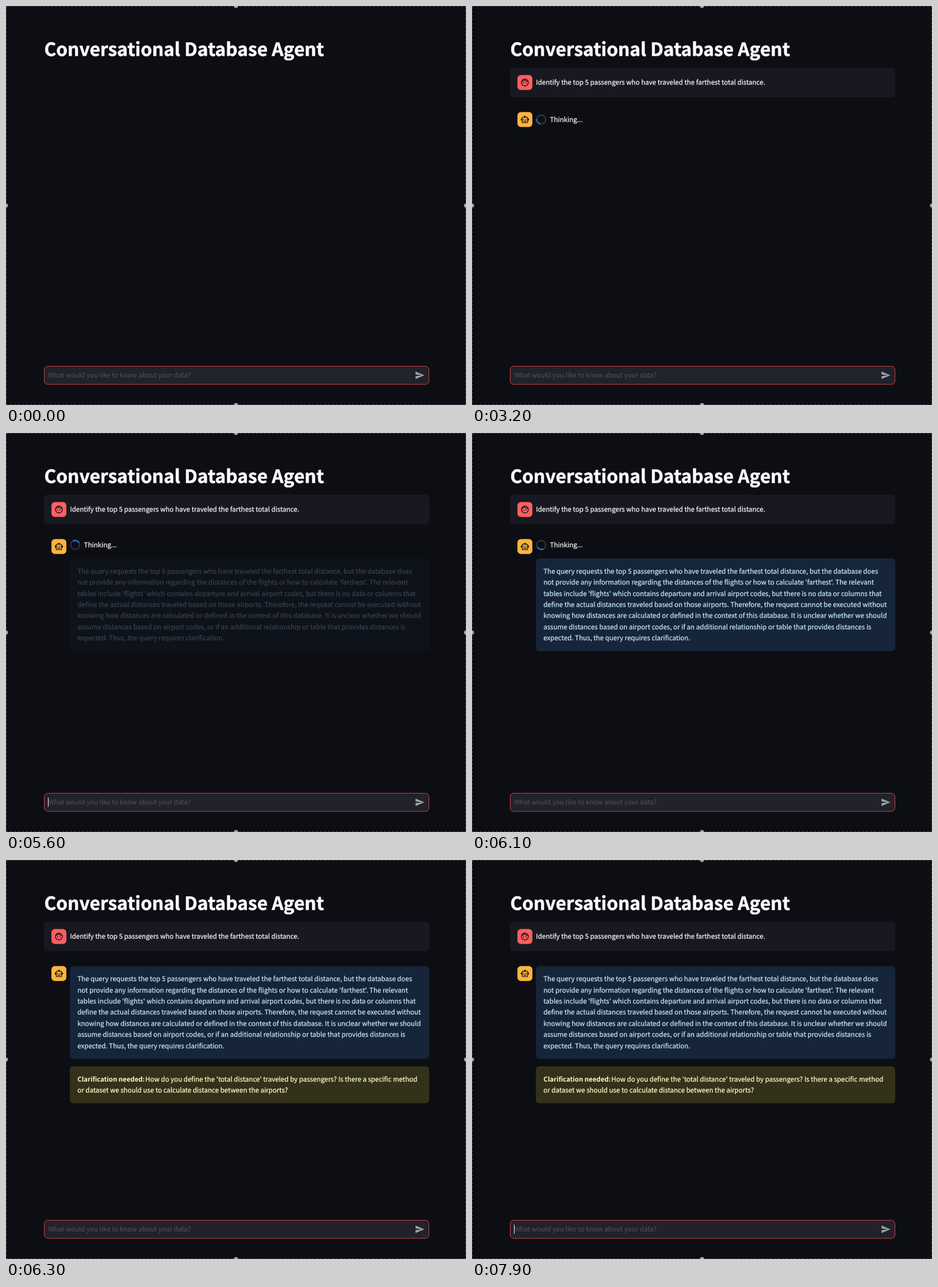
Recreate the animation shown at these times as an HTML page with a canvas. Size 800 by 695 pixels, loop 8000 ms.

```html
<!DOCTYPE html>
<html lang="en">
<head>
<meta charset="utf-8">
<title>Conversational Database Agent</title>
<style>
html, body { margin: 0; width: 100%; height: 100%; overflow: hidden; background: #0d0e13; }
canvas { display: block; width: 800px; height: 695px; }
</style>
</head>
<body>
<canvas id="stage"></canvas>
<script>
const W = 800, H = 695, LOOP = 8000, STEP = 100;
const MESSAGE_AT = 400, SPINNER_AT = 500, INFO_AT = 5500, DONE_AT = 6200;
const FONT = '"Noto Sans CJK JP", "Noto Sans CJK SC", "Noto Sans CJK", "Open Sans", sans-serif';
const BODY = 11.56, LINE = 19.35, BG = '#0d0e13', INK = '#fafafc';

const INFO = [
  'The query requests the top 5 passengers who have traveled the farthest total distance, but the database does',
  "not provide any information regarding the distances of the flights or how to calculate 'farthest'. The relevant",
  "tables include 'flights' which contains departure and arrival airport codes, but there is no data or columns that",
  'define the actual distances traveled based on those airports. Therefore, the request cannot be executed without',
  'knowing how distances are calculated or defined in the context of this database. It is unclear whether we should',
  'assume distances based on airport codes, or if an additional relationship or table that provides distances is',
  'expected. Thus, the query requires clarification.'
];

const canvas = document.getElementById('stage');
const ctx = canvas.getContext('2d');
const dpr = window.devicePixelRatio || 1;
canvas.width = W * dpr;
canvas.height = H * dpr;

// The thin outline gives the slightly heavier look of smoothed light text on dark.
function text(str, x, y, color = INK, { size = BODY, weight = 400, outline = 0.25 } = {}) {
  ctx.font = `${weight} ${size}px ${FONT}`;
  ctx.textRendering = 'geometricPrecision';
  ctx.fillStyle = ctx.strokeStyle = color;
  ctx.fillText(str, x, y);
  if (!outline) return;
  ctx.lineJoin = 'round';
  ctx.lineWidth = outline;
  ctx.strokeText(str, x, y);
}

function box(x, y, w, h, r, fill, stroke) {
  ctx.beginPath();
  ctx.roundRect(x, y, w, h, r);
  ctx.fillStyle = fill;
  ctx.fill();
  if (stroke) {
    ctx.strokeStyle = stroke;
    ctx.lineWidth = 1;
    ctx.stroke();
  }
}

function disc(x, y, r, color) {
  ctx.beginPath();
  ctx.arc(x, y, r, 0, 7);
  ctx.fillStyle = color;
  ctx.fill();
}

function ring(x, y, r, width, color, from = 0, to = Math.PI * 2) {
  ctx.beginPath();
  ctx.arc(x, y, r, from, to);
  ctx.strokeStyle = color;
  ctx.lineWidth = width;
  ctx.stroke();
}

// Draws a path laid out on a 24-unit icon grid.
function icon(d, x, y, scale, color) {
  ctx.save();
  ctx.translate(x, y);
  ctx.scale(scale, scale);
  ctx.fillStyle = color;
  ctx.fill(new Path2D(d), 'evenodd');
  ctx.restore();
}

function userAvatar() {
  box(79, 120.3, 26, 26, 6, '#fc5f60');
  ring(92, 133.2, 6, 1.35, '#16171d');
  ctx.beginPath();
  ctx.moveTo(86.4, 132.2);
  ctx.quadraticCurveTo(89.6, 131, 90.6, 127.8);
  ctx.quadraticCurveTo(93, 131.4, 97.4, 131);
  ctx.stroke();
  disc(89.9, 134, 0.9, '#16171d');
  disc(94.1, 134, 0.9, '#16171d');
}

function botAvatar() {
  box(79, 184.8, 26, 26, 6, '#ffb43c');
  icon('M20 9V7c0-1.1-.9-2-2-2h-3a3 3 0 0 0-6 0H6c-1.1 0-2 .9-2 2v2a3 3 0 0 0 0 6v4c0 1.1.9 2 2 2h12' +
    'c1.1 0 2-.9 2-2v-4a3 3 0 0 0 0-6zM18 19H6V7h12zM7.5 11.5a1.5 1.5 0 0 0 3 0a1.5 1.5 0 0 0-3 0z' +
    'M13.5 11.5a1.5 1.5 0 0 0 3 0a1.5 1.5 0 0 0-3 0zM8 15h8v2H8z', 84, 189.8, 0.667, '#16171d');
}

function spinner(t, y) {
  const top = -Math.PI / 2 + (t - 1560) / 1000 * Math.PI * 2;
  ring(120.3, y, 7.8, 2.4, '#30323b');
  ring(120.3, y, 7.8, 2.4, '#2470c8', top - Math.PI / 4, top + Math.PI / 4);
  text('Thinking...', 135.6, y + 4.3);
}

function info(y, alpha) {
  ctx.globalAlpha = alpha;
  box(111, y, 625, 161.5, 6, '#162539');
  INFO.forEach((line, i) => text(line, 124.2, y + 26.6 + i * LINE, '#c9e7fb'));
  ctx.globalAlpha = 1;
}

function clarification() {
  const ink = '#fefdcb';
  box(111, 359.3, 625, 64.5, 6, '#34311a');
  text('Clarification needed:', 124.2, 386, ink, { size: 11.4, weight: 700, outline: 0 });
  text("How do you define the 'total distance' traveled by passengers? Is there a specific method", 242.3, 386, ink);
  text('or dataset we should use to calculate distance between the airports?', 124.2, 386 + LINE, ink);
}

function inputBar(t) {
  box(66.5, 627.5, 669, 31.5, 6, '#21222b', '#cf4146');
  text('What would you like to know about your data?', 73.4, 647.3, '#53545d', { outline: 0 });
  if (t % 1000 >= 500) {
    ctx.fillStyle = '#f0f1f4';
    ctx.fillRect(73, 635, 1, 16);
  }
  icon('M2 21L23 12L2 3V10L17 12L2 14z', 710.8, 634.5, 0.73, '#a2a3a9');
}

function selection() {
  ctx.setLineDash([4, 3]);
  ctx.strokeStyle = '#505156';
  ctx.lineWidth = 1;
  ctx.strokeRect(0.5, 0.5, W - 1, H - 1);
  ctx.setLineDash([]);
  for (const [x, y] of [[400, 0], [400, H], [0, 347.5], [W, 347.5]]) disc(x, y, 3.6, '#a5a6a9');
}

function draw(t) {
  ctx.setTransform(dpr, 0, 0, dpr, 0, 0);
  ctx.fillStyle = BG;
  ctx.fillRect(0, 0, W, H);
  text('Conversational Database Agent', 66.5, 87, '#fbfbfd', { size: 31.7, weight: 700, outline: 0.6 });
  if (t >= MESSAGE_AT) {
    box(66, 107.5, 670, 51.5, 6, '#181920');
    userAvatar();
    text('Identify the top 5 passengers who have traveled the farthest total distance.', 111.3, 137.2);
    botAvatar();
  }
  if (t >= DONE_AT) {
    info(184.8, 1);
    clarification();
  } else if (t >= INFO_AT) {
    spinner(t, 195);
    info(218.4, Math.min(1, 0.02 + (t - INFO_AT) / 550));
  } else if (t >= SPINNER_AT) {
    spinner(t, 197.6);
  }
  inputBar(t);
  selection();
}

const start = performance.now();
function frame(now) {
  const t = Math.max(0, now - start) % LOOP;
  draw(Math.floor(t / STEP) * STEP);
  requestAnimationFrame(frame);
}
draw(0);
requestAnimationFrame(frame);
</script>
</body>
</html>
```
